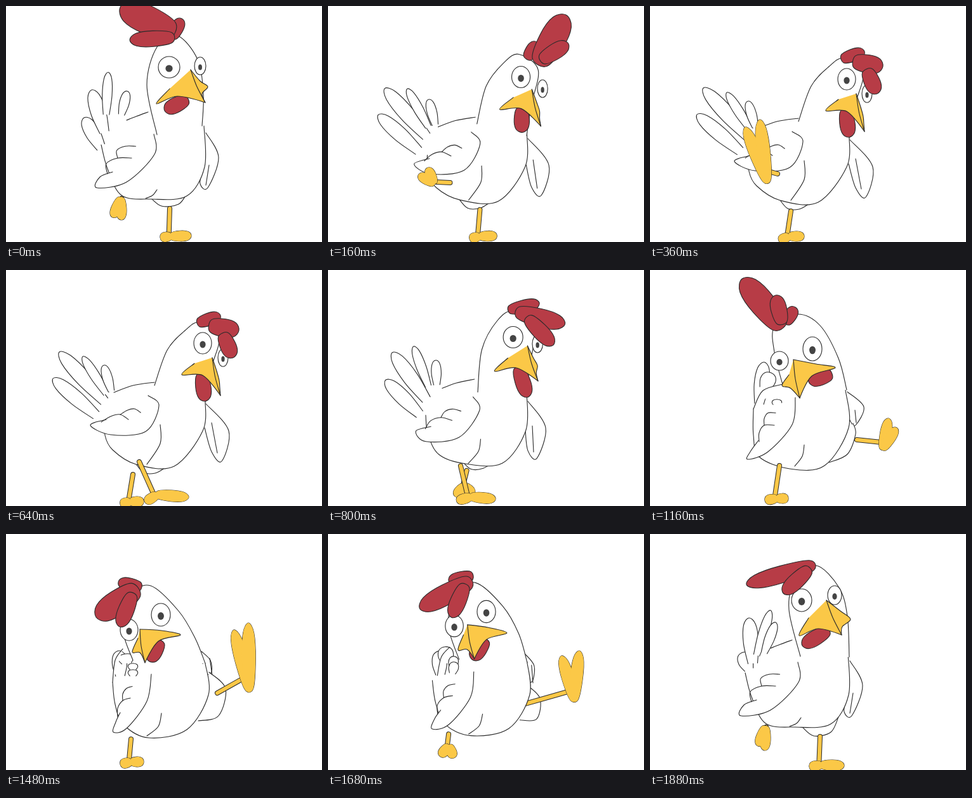
Animation of 498x374 px, one loop 1920 ms. Source, as an HTML page with a canvas:

```html
<!DOCTYPE html>
<html lang="en">
<head>
<meta charset="utf-8">
<title>Dancing chicken</title>
<style>
html, body { margin: 0; width: 100%; height: 100%; overflow: hidden; background: #fff; }
canvas { display: block; }
</style>
</head>
<body>
<canvas id="stage" width="498" height="374"></canvas>
<script>
const ctx = document.getElementById('stage').getContext('2d');
const LOOP = 1920, STEP = 40;
const INK = '#2b2b2b', WHITE = '#fff', RED = '#b73c46', YELLOW = '#fbc847', PUPIL = '#444';

// Key times, and which key is used at each, by the number of keys a part has.
const POSES = [0, 220, 360, 640, 960, 1160, 1480, 1600, 1880];
const ORDER = {
  4: [0, 1, 1, 1, 0, 2, 3, 3, 0],
  5: [0, 1, 1, 1, 0, 2, 3, 3, 4],
  6: [0, 1, 1, 1, 2, 3, 4, 4, 5]
};
const COMB = [0, 200, 360, 640, 960, 1060, 1160, 1480, 1880];
const COMB_ORDER = [0, 1, 2, 2, 3, 4, 5, 6, 7];
const NEAR_STEP = [0, 200, 360, 640, 960, 1160, 1480, 1880];
const FAR_STEP = [0, 360, 640, 960, 1160, 1480, 1680, 1880];

const parts = [];
function add(draw, data, times = POSES, order) {
  const keys = data.split('|').map(k => k.trim().split(/\s+/).map(Number));
  order = order || (times === POSES ? ORDER[keys.length] : keys.map((_, i) => i));
  parts.push({ draw, times, keys: order.map(i => keys[i]) });
}

// Smooth periodic interpolation without overshoot.
function sample({ keys, times }, t) {
  const n = times.length;
  const key = k => keys[(k + n) % n];
  const time = k => times[(k + n) % n] + LOOP * Math.floor(k / n);
  let i = n - 1;
  while (times[i] > t) i--;
  const h = time(i + 1) - time(i), u = (t - time(i)) / h, v = 1 - u;
  return keys[i].map((a, j) => {
    const slope = k => (key(k + 1)[j] - key(k)[j]) / (time(k + 1) - time(k));
    const tangent = k => {
      const p = slope(k - 1), q = slope(k);
      return p * q > 0 ? 2 * p * q / (p + q) : 0;
    };
    return a * v * v * (1 + 2 * u) + key(i + 1)[j] * u * u * (1 + 2 * v)
      + h * u * v * (v * tangent(i) - u * tangent(i + 1));
  });
}

// Curve through the points; corners get no tangent.
function trace(p, closed, corners = []) {
  const n = p.length / 2;
  const wrap = i => closed ? (i + n) % n : Math.max(0, Math.min(n - 1, i));
  const at = i => [p[2 * wrap(i)], p[2 * wrap(i) + 1]];
  const handle = (i, sign) => at(i).map((c, j) =>
    corners.includes(i) ? c : c + sign * (at(i + 1)[j] - at(i - 1)[j]) / 6);
  ctx.beginPath();
  ctx.moveTo(...at(0));
  for (let i = 0; i < n - !closed; i++)
    ctx.bezierCurveTo(...handle(i, 1), ...handle(i + 1, -1), ...at(i + 1));
}

function paint(fill, stroke = INK, width = 1.1) {
  if (fill) { ctx.fillStyle = fill; ctx.fill(); }
  if (stroke) { ctx.strokeStyle = stroke; ctx.lineWidth = width; ctx.stroke(); }
}

function line(p) { trace(p); paint(); }
function open(p) { trace(p); paint(WHITE); }

// Rounded petal from a base to a tip.
function petal(bx, by, tx, ty, width, closed) {
  const dx = tx - bx, dy = ty - by, k = width / (Math.hypot(dx, dy) || 1);
  const side = [[0, .3], [.45, .48], [.85, .38], [1, 0], [.85, -.38], [.45, -.48], [0, -.3]];
  trace(side.flatMap(([u, v]) => [bx + u * dx - v * k * dy, by + u * dy + v * k * dx]), closed);
}
const feather = width => p => { petal(...p, width); paint(WHITE); };
const lobe = width => ([bx, by, tx, ty, w = width]) => {
  petal(bx, by, tx, ty, w, true);
  paint(RED);
};

function leg([hx, hy, x, y, ...tips]) {
  const limb = [hx, hy, x + (tips[0] - x) / 5, y + (tips[1] - y) / 5];
  trace(limb);
  paint(null, INK, 8);
  paint(null, YELLOW, 6);
  for (const stroke of [INK, null])
    for (const i of [0, 2]) {
      const tx = tips[i], ty = tips[i + 1];
      petal(x, y, tx, ty, 15 + Math.hypot(tx - x, ty - y) * .07, true);
      paint(YELLOW, stroke);
    }
}

function eye([x, y, rx, ry]) {
  const oval = (dy, size, fill, stroke) => {
    ctx.beginPath();
    ctx.ellipse(x, y + dy, rx * size, ry * size, 0, 0, 7);
    paint(fill, stroke);
  };
  oval(0, 1, WHITE, INK);
  oval(2, .33, PUPIL, null);
}

function beak(p) {
  trace(p, false, [0, 4]);
  paint(YELLOW);
  line([p[0], p[1], (p[0] + p[8]) / 2 - 2, (p[1] + p[9]) / 2, p[8], p[9]]);
}

function farWing(p) {
  open(p);
  const [ax, ay, bx, by] = p.slice(-4);
  line([ax + 9, ay + 2, bx + 11, by - 8]);
}

// Two scallops, the second a smaller copy of the first.
function fingers(p) {
  line(p);
  line(p.map((c, i) => p[4 + i % 2] + .75 * (c - p[i % 2])));
}

// Tail
add(feather(24), '150 225 123 177|142 230 74 172|172 212 180 146|180 225 178 185|156 215 145 188');
add(feather(25), '155 200 135 133|155 208 84 130|180 188 191 163|190 205 188 190|162 205 156 133');
add(feather(16), '158 172 161 105|158 196 121 137|200 215 200 205|200 215 200 205|168 192 190 121');
add(feather(16), '182 172 191 135|166 192 154 151|200 225 200 215|200 225 200 215|180 188 198 140');

// Far wing, thigh and leg
add(farWing, `315 201 335 240 318 288 306 282 309 260|315 212 351 255 340 303 324 288 313 250
  |311 193 337 217 324 246 316 240 312 230|308 186 322 200 324 218 316 222 310 205`);
add(open, `226 302 245 317 272 314 285 297|203 305 217 321 235 322 250 314|230 295 245 303 265 302 280 290
  |320 243 324 260 311 292 282 305|320 219 346 245 335 288 303 296|240 306 258 320 285 314 297 290`);
add(leg, `258 321 260 365 243 367 292 364|222 325 219 365 203 372 243 365
  |200 324 196 367 180 371 217 367|256 305 256 305 245 331 260 330
  |326 269 367 283 376 235 389 250|333 252 383 245 359 152 382 141
  |290 275 388 262 368 193 396 185|268 321 270 366 251 369 306 367`, FAR_STEP);

// Torso, back and head
add(open, `312 190 313 255 285 301 228 306 182 300 160 258 150 220
  |314 207 310 255 265 311 205 308 168 285 156 262 158 240
  |308 190 313 250 275 310 220 315 172 296 163 262 163 220
  |314 205 319 255 285 310 225 323 185 302 172 270 168 235`);
add(open, '190 181 205 175 224 168|170 194 200 183 234 178|163 220 178 191 209 181|168 235 172 200 184 182');
add(open, `238 204 222 125 238 65 270 47 302 85 311 140 309 190
  |234 183 254 127 282 96 305 83 336 105 322 160 314 209
  |210 185 196 130 196 90 232 70 268 88 297 140 310 190
  |200 200 184 150 198 98 228 82 272 122 298 165 314 205
  |237 194 219 120 228 75 262 50 298 85 311 130 314 195`);

// Haunch, near wing and leg
add(line, '238 291 231 300 220 305|243 245 243 275 222 308|243 277 240 295 228 311|245 284 240 305 222 320');
add(open, `233 203 234 235 190 279 143 288 148 271 168 263|224 199 241 215 220 256 165 261 133 246 158 237
  |229 202 224 245 186 288 154 300 158 288 171 270|229 222 222 265 190 308 169 314 173 298 180 283`);
add(fingers, `160 266 158 250 176 241 198 241|150 241 165 232 180 229 193 237
  |172 272 172 258 180 246 196 246|176 290 176 276 184 264 196 260`);
add(leg, `182 305 181 305 168 335 182 339|195 275 166 278 140 249 154 236
  |201 266 184 276 150 192 173 180|210 304 238 356 219 368 288 360
  |207 313 208 361 184 364 232 364|204 310 200 362 181 365 218 362
  |197 325 197 361 180 365 217 361|183 306 182 306 170 336 181 343`, NEAR_STEP);

// Face
add(eye, '257 97 17 17|310 116 14 17|204 144 14 15|194 152 14 17|239 105 16 18');
add(eye, '306 95 9 14|342 139 8 14|256 125 15 19|244 128 15 18|291 97 11 15');
add(lobe(21), `262 50 277 20|318 86 334 64|303 84 338 72|262 42 320 32
  |255 58 264 32|214 84 229 59|212 84 177 76|255 48 225 68`, COMB, COMB_ORDER);
add(lobe(), `262 40 180 2 46|340 95 392 20 42|322 88 367 96 30|262 46 380 60 30
  |244 60 250 -12 44|206 88 145 14 42|205 88 142 132 40|255 50 152 80 28`, COMB, COMB_ORDER);
add(lobe(26), `262 50 195 54|343 92 400 62|342 102 358 139|268 52 347 76
  |240 62 243 25|208 84 198 40|199 96 179 147|250 56 210 94`, COMB, COMB_ORDER);
add(lobe(25), `285 148 250 166|308 165 314 208|289 146 316 190
  |285 165 250 177|243 170 226 202|280 153 240 177`);
add(beak, `291 101 306 119 318 128 309 139 314 153 270 143 237 155 258 131
  |325 139 332 160 336 175 337 187 338 199 310 167 277 166 297 148
  |226 142 262 149 292 155 255 168 236 203 221 187 208 183 219 166
  |211 151 245 153 275 160 240 170 219 204 211 188 199 187 208 165
  |278 105 300 122 316 135 303 147 302 160 265 150 235 161 250 133`);

ctx.lineCap = ctx.lineJoin = 'round';
const start = performance.now();
function frame() {
  const elapsed = (performance.now() - start) % LOOP;
  const t = Math.floor(elapsed / STEP) * STEP;
  ctx.fillStyle = WHITE;
  ctx.fillRect(0, 0, 498, 374);
  for (const part of parts) part.draw(sample(part, t));
  requestAnimationFrame(frame);
}
frame();
</script>
</body>
</html>
```
